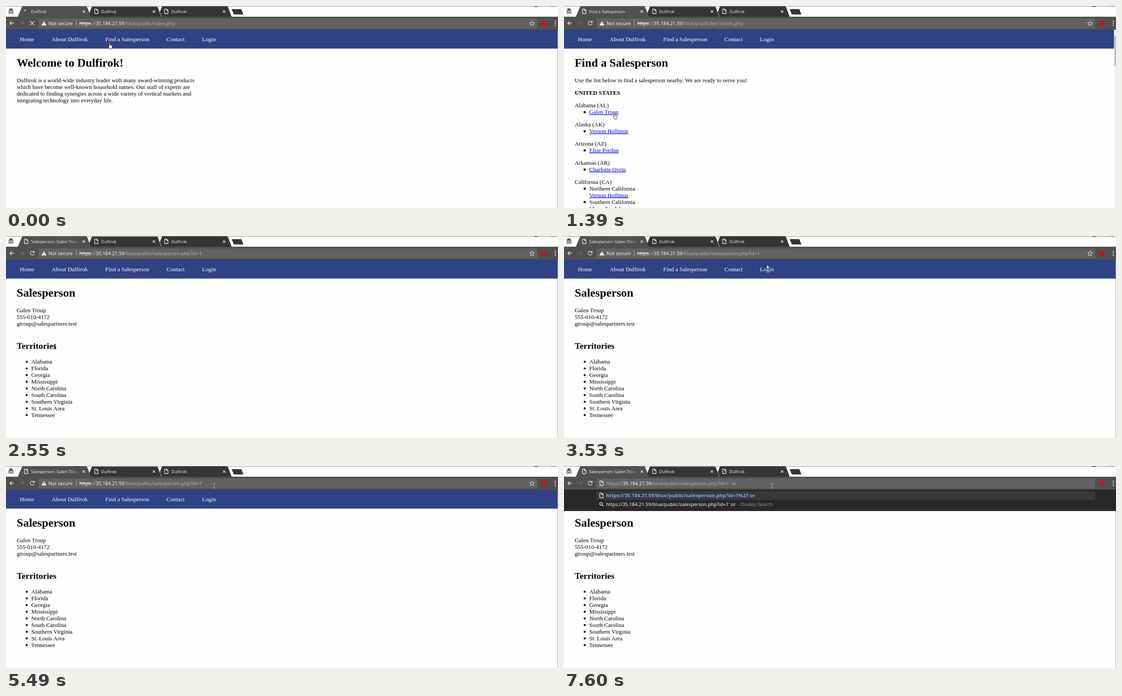
These frames come from a looping animation (1235x453 px, 8000 ms). An HTML page:

```html
<!DOCTYPE html>
<html lang="en">
<head>
<meta charset="utf-8">
<title>Browser session</title>
<style>
  html, body { margin: 0; width: 100%; height: 100%; overflow: hidden; background: #fff; }
  svg { display: block; }
  text { white-space: pre; }
  .ui { font: 10.78px "Open Sans", "Noto Sans", sans-serif; }
  .tab { font-size: 9.2px; fill: #f4f4f4; }
  .page { font: 12.97px "Liberation Serif", serif; }
  .nav { font-size: 13.05px; fill: #fff; }
  .h1 { font-size: 25.95px; font-weight: bold; }
  .h2 { font-size: 19.45px; font-weight: bold; }
  .bold { font-weight: bold; }
  .link { fill: #0000ee; text-decoration: underline; }
  .strike { text-decoration: line-through; }
  .line { fill: none; stroke: #e8e8e8; stroke-width: 1.3; }
  .host { fill: #fff; }
  .dim { fill: #b4b4b4; }
</style>
</head>
<body>
<svg id="stage" width="1235" height="453" viewBox="0 0 1235 453">
  <defs>
    <linearGradient id="fade"><stop offset="0" stop-color="#505050" stop-opacity="0"/><stop offset="1" stop-color="#505050"/></linearGradient>
    <path id="doc" class="line" d="M.5 .5H5L8 3.5V10.5H.5ZM5 .5V3.5H8"/>
    <path id="close" class="line" d="M-2.5-2.5L2.5 2.5M2.5-2.5L-2.5 2.5"/>
    <path id="arrow" d="M.5 .5V10.5L2.8 8.4 4.4 12 6 11.3 4.5 7.8H7.6Z" fill="#fff" stroke="#111" stroke-width=".8"/>
    <path id="hand" d="M3 9V1.6Q3.1.5 4 .5 4.9.5 5 1.6V5.6Q5.7 5 6.5 6 7.4 5.4 8.1 6.5 9.3 6 9.5 7.4V10.3Q9.4 12 8.4 13V14.6H3.6V13L.7 9.4Q.3 8.2 1.4 8Z" fill="#fff" stroke="#111" stroke-width=".8"/>
    <path id="beam" d="M-2.5.5H-.7L0 1 .7.5H2.5M0 1V11M-2.5 11.5H-.7L0 11 .7 11.5H2.5" fill="none" stroke="currentColor"/>
  </defs>

  <rect width="1235" height="453" fill="#fefefe"/>
  <g class="page">
    <rect y="53" width="1235" height="42.5" fill="#2f4287"/>
    <path d="M0 53.5H1235" stroke="#3a3f55"/>
    <g id="nav" class="nav"></g>
    <g id="home"></g>
    <g id="territories"></g>
    <g id="salesperson"></g>
    <path d="M1234.5 53V453" stroke="#a8a8a8"/>
    <g id="scrollbar">
      <rect x="1230.5" y="53" width="5" height="400" fill="#f1f1f1"/>
      <rect x="1231.5" y="67" width="4" height="67" fill="#bdbdbd"/>
    </g>
  </g>

  <g class="ui">
    <rect width="1235" height="25" fill="#fff"/>
    <path d="M0 .5H1235" stroke="#8a8a8a"/>
    <path d="M1182 1.5H1190M1220 0L1222.5 2.5M1229 0L1226.5 2.5" stroke="#444"/>
    <g fill="#444"><path d="M8 5.5H10L11 6 12 5.5H14L15.2 9.5H6.8ZM5 10.3H17V11.4H5Z"/>
      <g fill="none" stroke="#444" stroke-width="1.2"><circle cx="8" cy="14.8" r="2"/><circle cx="14" cy="14.8" r="2"/><path d="M10 14.3H12"/></g></g>
    <g fill="#353535">
      <path d="M340 24.5L349 1H494Q496 1 497 3L505 24.5Z"/>
      <path d="M183 24.5L192 1H337Q339 1 340 3L348 24.5Z" stroke="#ddd" stroke-width=".8"/>
      <path d="M506 7H525Q526.5 7 527 8L531 19H511.5Q510 19 509.5 18L505 8Z"/>
    </g>
    <rect y="24" width="1235" height="29" fill="#505050"/>
    <path d="M26 25L35.5 2.5Q36 1 38 1H179Q181 1 182 3L190 25Z" fill="#505050"/>
    <use href="#doc" x="198" y="6.5"/><use href="#doc" x="354.5" y="6.5"/>
    <use href="#close" x="174" y="12.5"/><use href="#close" x="331" y="12.5"/><use href="#close" x="488" y="12.5"/>
    <text class="tab" x="213" y="16">Dulfirok</text>
    <text class="tab" x="370" y="16">Dulfirok</text>
    <svg x="56" width="107" height="24">
      <text id="title" class="tab" y="16"></text>
      <rect x="91" width="16" height="24" fill="url(#fade)"/>
    </svg>
    <use id="favicon" href="#doc" x="41" y="6.5"/>
    <path id="spinner" class="line" d="M0-5A5 5 0 0 1 5 0" pathLength="90"/>

    <path class="line" d="M18 38.5H8.5M13 34L8.5 38.5 13 43"/>
    <path class="line" style="stroke:#6c6c6c" d="M31 38.5H40.5M36 34L40.5 38.5 36 43"/>
    <path id="stop" class="line" d="M54 34L63 43M63 34L54 43"/>
    <g id="reload"><path class="line" d="M62 35.2A4.5 4.5 0 1 0 63 40"/><path d="M63.7 33V37.7H59Z" fill="#e8e8e8"/></g>
    <rect x="73" y="28" width="1115.5" height="22" rx="2" fill="#626262"/>
    <circle cx="1203.5" cy="39" r="6" fill="#c9131c"/>
    <g fill="#e8e8e8"><circle cx="1229" cy="34.3" r="1.3"/><circle cx="1229" cy="38.8" r="1.3"/><circle cx="1229" cy="43.3" r="1.3"/></g>

    <g id="viewing">
      <path d="M84.8 34L90.3 43.5H79.3Z" fill="#fff"/>
      <path d="M84.8 37V40.3M84.8 41.3V42.4" stroke="#555" stroke-width="1.1"/>
      <text x="95" y="42.5" fill="#fff">Not secure</text>
      <path d="M157.5 32V46" stroke="#b5b5b5"/>
      <path class="line" style="stroke-width:1" d="M1177 33.5L1178.5 37.3 1182.5 37.5 1179.4 40 1180.5 44 1177 41.7 1173.5 44 1174.6 40 1171.5 37.5 1175.5 37.3Z"/>
      <rect id="selection" x="164" y="30" width="275.5" height="16" fill="#3367d6"/>
      <text id="address" x="164" y="42.5"></text>
    </g>
    <g id="editing">
      <use href="#doc" x="80" y="33"/>
      <text id="typed" x="95" y="42.5"></text>
      <rect y="53" width="1235" height="48" fill="#282828"/>
      <rect x="72" y="56" width="1116.5" height="20" fill="#383838"/>
      <use href="#doc" x="79.5" y="60.5"/>
      <text id="suggestion" x="94" y="69.8" fill="#7baaf7" style="font-size:11px;font-weight:bold"></text>
      <g class="line"><circle cx="82.8" cy="85" r="3"/><path d="M85 87.3L88.5 90.7"/></g>
      <text id="search" class="host" x="94" y="90"></text>
    </g>
    <path id="caret" d="M.5 30V46" stroke="#fff"/>
  </g>
  <use id="cursor"/>
</svg>

<script>
const $ = id => document.getElementById(id);
const show = (id, on) => { $(id).style.display = on ? "" : "none"; };
const label = (x, y, text, cls = "") => `<text x="${x}" y="${y}" class="${cls}">${text}</text>`;
const square = y => `<rect x="44" y="${y - 6.2}" width="4.5" height="4.5"/>`;

$("nav").innerHTML = [[31, "Home"], [102, "About Dulfirok"], [222, "Find a Salesperson"], [359, "Contact"], [438.5, "Login"]]
  .map(([x, text]) => label(x, 79, text)).join("");

$("home").innerHTML = label(24, 136, "Welcome to Dulfirok!", "h1") + [
  "Dulfirok is a world-wide industry leader with many award-winning products",
  "which have become well-known household names. Our staff of experts are",
  "dedicated to finding synergies across a wide variety of vertical markets and",
  "integrating technology into everyday life."
].map((text, i) => label(24, 171 + 15 * i, text)).join("");

const states = [["Alabama (AL)", "Galen Troup"], ["Alaska (AK)", "Vernon Hollimar"],
  ["Arizona (AZ)", "Elise Pordan"], ["Arkansas (AR)", "Charlotte Ovrin"]];
const regions = [["Northern California", "Vernon Hollimar"], ["Southern California", "Moira Fendalo"]];
$("territories").innerHTML = label(24, 136, "Find a Salesperson", "h1") +
  label(24, 171, "Use the list below to find a salesperson nearby. We are ready to serve you!") +
  label(24, 199, "UNITED STATES", "bold") +
  states.map(([state, person], i) => {
    const y = 227 + 42.9 * i;
    return label(24, y, state) + square(y + 15) + label(56.5, y + 15, person, "link");
  }).join("") +
  label(24, 398.5, "California (CA)") +
  regions.map(([region, person], i) => {
    const y = 413.5 + 30 * i;
    return square(y) + label(56.5, y, region) + label(56.5, y + 15, person, "link");
  }).join("");

$("salesperson").innerHTML = label(24, 136, "Salesperson", "h1") +
  ["Galen Troup", "555-010-4172", "gtroup@salespartners.test"]
    .map((text, i) => label(24, 171 + 15 * i, text)).join("") +
  label(24, 253, "Territories", "h2") +
  ["Alabama", "Florida", "Georgia", "Mississippi", "North Carolina", "South Carolina",
    "Southern Virginia", "St. Louis Area", "Tennessee"].map((text, i) =>
    `<circle cx="46.3" cy="${282 + 14.95 * i}" r="2.3"/>` + label(56.5, 286 + 14.95 * i, text)).join("");

// Each track lists [start time, value...]; a value holds until the next start.
const LOOP = 8000;
const tracks = {
  page: [[0, "home"], [460, "territories"], [2550, "salesperson"]],
  path: [[0, "index.php"], [150, "territories.php"], [2390, "salesperson.php?id=1"]],
  title: [[0, "Dulfirok"], [150, "https://35.184.21.59/blue/public"], [460, "Find a Salesperson"],
    [2390, "https://35.184.21.59/blue/public"], [2550, "Salesperson: Galen Troup"]],
  // arc start angle and sweep; a sweep of 0 means loaded
  spinner: [[0, -85, 65], [150, -45, 50], [460, 0, 0], [2240, -60, 40], [2390, -22, 35], [2550, 0, 0]],
  cursor: [[0, "hand", 228, 82], [730, "arrow", 218, 152], [950, "arrow", 166, 210],
    [1090, "arrow", 134, 226], [1240, "hand", 107, 233], [1390, "hand", 109, 239.5],
    [2240, "arrow", 111, 239], [2550, "beam", 109.5, 242], [2980, "arrow", 222, 200],
    [3250, "arrow", 335, 138], [3380, "arrow", 425, 89], [3530, "arrow", 453, 64],
    [3680, "arrow", 460, 52], [3810, "beam", 464.5, 39], [3960, "beam", 465.5, 38]],
  caret: [[0, false], [4240, true], [4520, false], [4930, true], [5490, false],
    [6070, true], [6500, false], [6620, true], [7600, false]],
  selected: [[0, false], [4520, true], [4930, false]],
  typed: [[0, null], [6070, ""], [6620, " "], [6740, " o"], [6890, " or"], [7140, " or "]]
};
const at = (track, t) => track.findLast(([start]) => start <= t).slice(1);

const host = "35.184.21.59", folder = "/blue/public/";
const span = (cls, text) => `<tspan class="${cls}">${text}</tspan>`;

function render(t) {
  const [page] = at(tracks.page, t), [path] = at(tracks.path, t);
  const [angle, sweep] = at(tracks.spinner, t), [shape, x, y] = at(tracks.cursor, t);
  const [caret] = at(tracks.caret, t), [selected] = at(tracks.selected, t), [typed] = at(tracks.typed, t);
  const editing = typed !== null;

  for (const id of ["home", "territories", "salesperson"]) show(id, id === page);
  show("scrollbar", page === "territories");
  $("title").textContent = at(tracks.title, t)[0];
  show("spinner", sweep);
  show("stop", sweep);
  show("favicon", !sweep);
  show("reload", !sweep);
  $("spinner").setAttribute("transform", `translate(46 12.5) rotate(${angle})`);
  $("spinner").setAttribute("stroke-dasharray", `${sweep} 360`);

  show("viewing", !editing);
  show("editing", editing);
  show("selection", selected);
  $("address").innerHTML = selected
    ? span("host", "https://" + host + folder + path)
    : span("host strike", "https") + span("dim", "://") + span("host", host) + span("dim", folder + path);
  let caretX = 439;
  if (editing) {
    const url = "https://" + host + folder + path, words = typed.trimEnd();
    $("typed").innerHTML = span("dim", "https://") + span("host", host) + span("dim", folder + path + "'" + typed);
    $("suggestion").textContent = url + "%27" + words;
    $("search").innerHTML = url + "'" + words + `<tspan dx="2" fill="#949494"> - Dovlep Search</tspan>`;
    caretX = Math.round(95 + $("typed").getComputedTextLength());
  }
  show("caret", caret);
  $("caret").setAttribute("transform", `translate(${caretX})`);

  $("cursor").setAttribute("href", "#" + shape);
  $("cursor").setAttribute("transform", `translate(${x} ${y})`);
  $("cursor").setAttribute("color", y < 53 ? "#b4b4b4" : "#111");
}

const begin = performance.now();
function tick() {
  render((performance.now() - begin) % LOOP);
  requestAnimationFrame(tick);
}
tick();
</script>
</body>
</html>
```
